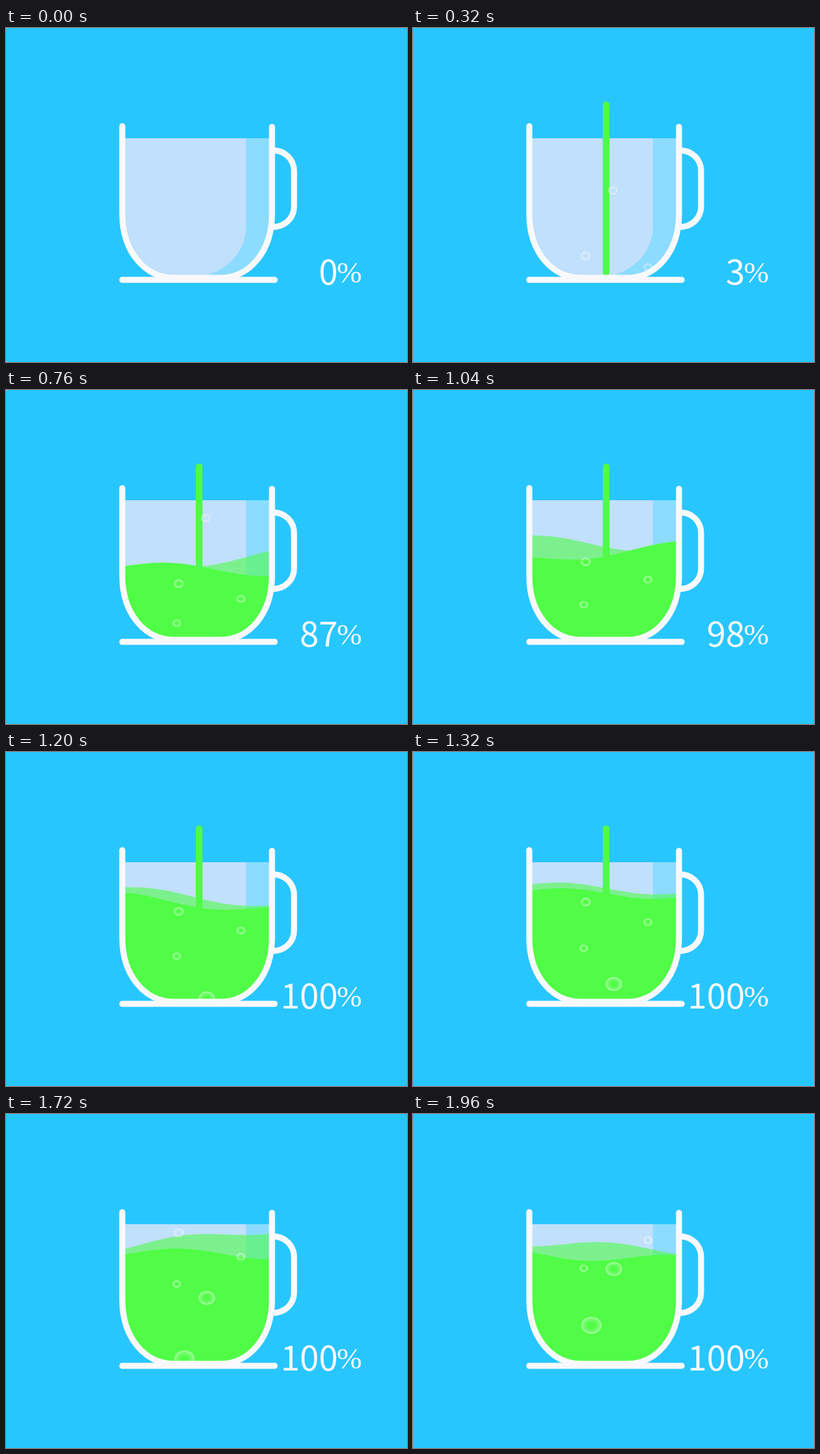
These frames come from a looping animation (600x500 px, 2000 ms). An HTML page:

```html
<!DOCTYPE html>
<html lang="en">
<head>
<meta charset="utf-8">
<title>Filling cup</title>
<style>
  html, body { margin: 0; width: 100%; height: 100%; overflow: hidden; background: #28c6ff; }
  svg { display: block; }
  text { fill: #f9f9fb; }
  #count { font: 300 51.5px "Noto Sans CJK SC", "Noto Sans CJK JP", "Noto Sans", sans-serif; text-anchor: end; }
  #sign { font: 45px "Liberation Serif", serif; }
  .glass { fill: none; stroke: #f9f9fb; stroke-width: 9; stroke-linecap: round; }
</style>
</head>
<body>
<svg width="600" height="500" viewBox="0 0 600 500">
  <defs>
    <clipPath id="inside">
      <path d="M174 165V278C174 334 207 374 252 374H320C365 374 398 334 398 278V165Z"/>
    </clipPath>
    <radialGradient id="shine">
      <stop offset=".3" stop-color="#fff" stop-opacity="0"/>
      <stop offset=".8" stop-color="#fff" stop-opacity=".22"/>
      <stop offset="1" stop-color="#fff" stop-opacity=".36"/>
    </radialGradient>
  </defs>
  <g clip-path="url(#inside)">
    <path fill="#8cdcff" d="M174 165H398V374H174Z"/>
    <path fill="#c0e0fc" d="M174 165H359V297C359 332 336 359 300 370V374H174Z"/>
    <path id="back" fill="#50fc46" fill-opacity=".6"/>
  </g>
  <path id="stream" stroke="#50fc46" stroke-width="10" stroke-linecap="round"/>
  <g clip-path="url(#inside)">
    <path id="front" fill="#50fc46"/>
    <g id="bubbles" fill="url(#shine)" stroke="#fff" stroke-opacity=".32" stroke-width="1.7"></g>
  </g>
  <path class="glass" d="M398 183C418 183 431 197 431 214V267C431 285 417 298 398 298"/>
  <path class="glass" d="M174 147V278C174 334 207 374 252 374H320C365 374 398 334 398 278V148"/>
  <path class="glass" d="M174 377H402"/>
  <text id="count" x="496.7" y="384"></text>
  <text id="sign" x="495" y="381">%</text>
</svg>
<script>
const $ = id => document.getElementById(id);
const LOOP = 2000, STEP = 40, START = 120, WAVE = 260, MIDDLE = 286, BOTTOM = 376;

// x, y at time zero, rise per ms, radius
const bubbles = [
  [299, 280.7, .1167, 6.5],
  [258.5, 378.4, .1165, 6.8],
  [351.5, 391, .1031, 6],
  [255.5, 423.7, .0983, 5.7],
  [300.5, 585.2, .1802, 11.6],
  [267, 728, .21, 14.4]
].map(([x, y, rise, r]) => {
  const el = document.createElementNS("http://www.w3.org/2000/svg", "ellipse");
  el.setAttribute("cx", x);
  el.setAttribute("rx", r);
  el.setAttribute("ry", r * .84);
  $("bubbles").append(el);
  return { el, y, rise };
});

const clamp = v => Math.max(0, Math.min(1, v));
const mix = (a, b, k) => a + (b - a) * k;
const swing = (v, peak, period) => Math.cos(2 * Math.PI * (v - peak) / period);

// Liquid height rises with a quadratic ease-out
const fill = (t, top) => mix(top, BOTTOM, (1 - clamp((t - 280) / 1300)) ** 2);

function surface(level, tilt, height, crest) {
  return x => level + tilt * (x - MIDDLE) / 107 - height * swing(x, crest, WAVE);
}

function frontWave(t) {
  const level = fill(t, 207) + 8 * swing(t, 1090, 800);
  const crest = 438 + .553 * (t - 1160) + 42 * swing(t, 880, 950);
  return surface(level, 10 * swing(t, 1230, 400), 7, crest);
}

function backWave(t) {
  const sway = swing(t, 1150, 950);
  const level = fill(t, 193) + 9 * sway;
  return surface(level, 13 * sway - 2, 6.5, 210 + .1 * (t - 1160));
}

function drawWave(id, y) {
  let d = "M170 390";
  for (let x = 170; x <= 402; x += 4) d += `L${x} ${y(x).toFixed(2)}`;
  $(id).setAttribute("d", d + "V390Z");
}

// Strong ease: bezier (.75, 0, 0, 1)
function ease(x) {
  let lo = 0, hi = 1;
  for (let i = 0; i < 24; i++) {
    const s = (lo + hi) / 2;
    if (2.25 * (1 - s) ** 2 * s + s ** 3 < x) lo = s; else hi = s;
  }
  return lo * lo * (3 - 2 * lo);
}

function draw(t) {
  const front = frontWave(t);
  drawWave("front", front);
  drawWave("back", backWave(t));
  $("back").style.display = $("front").style.display = $("bubbles").style.display =
    t < START ? "none" : "";

  const top = mix(115, 225, clamp((t - 1500) / 180));
  const end = Math.min(mix(115, 366, clamp((t - 100) / 160)), front(289) + 2);
  $("stream").setAttribute("d", t >= START && top < end ? `M289 ${top}V${end}` : "");

  for (const b of bubbles) b.el.setAttribute("cy", b.y - b.rise * t);
  $("count").textContent = Math.round(100 * ease(clamp((t - 100) / 1200)));
}

const begin = performance.now();
function tick() {
  const t = (performance.now() - begin) % LOOP;
  draw(Math.floor(t / STEP) * STEP);
  requestAnimationFrame(tick);
}
tick();
</script>
</body>
</html>
```
